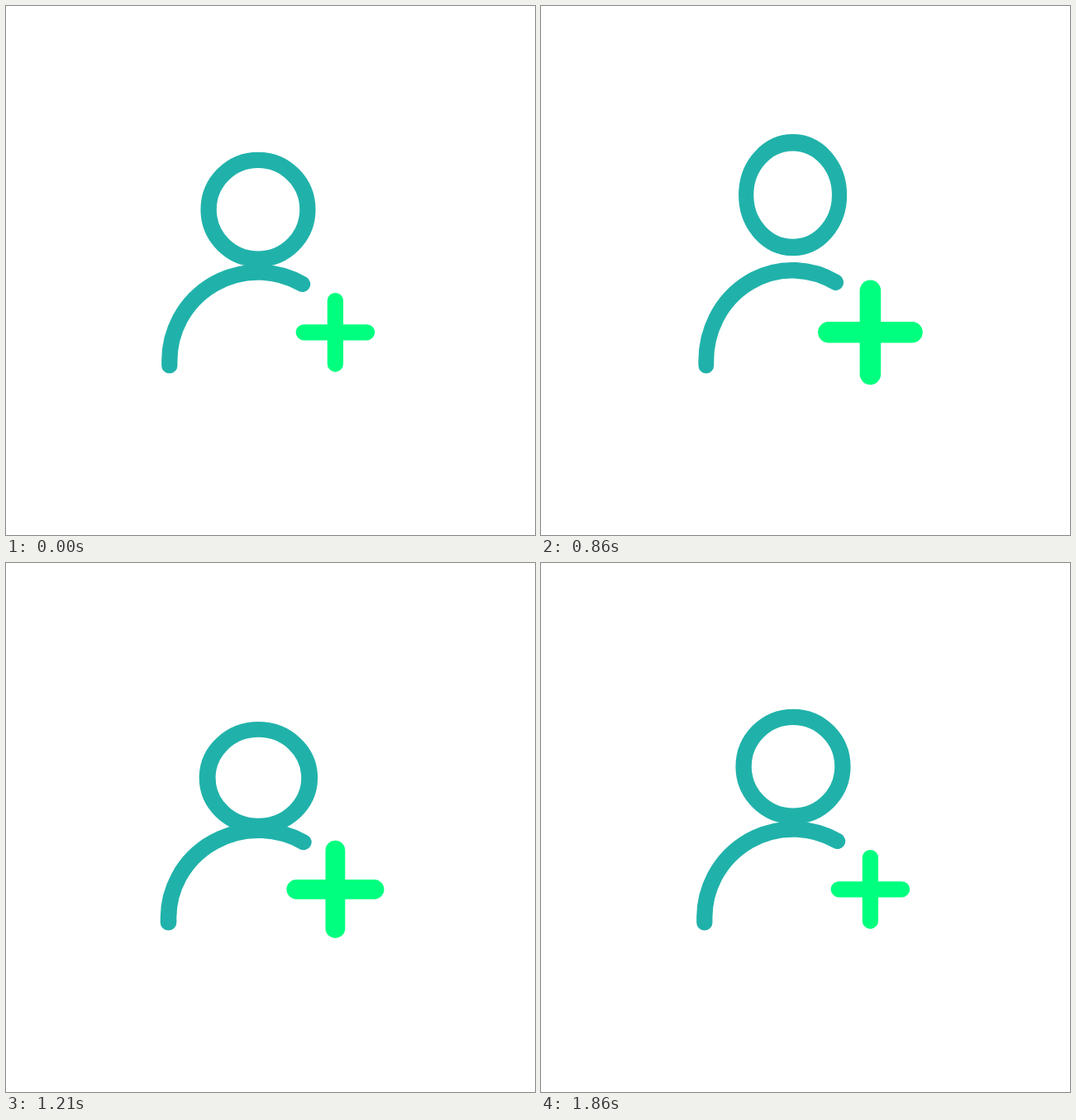
An HTML page that plays this animation: 640x640 px, repeating every 2.43 s.

```html
<!DOCTYPE html>
<html lang="en">
<head>
<meta charset="utf-8">
<title>Add user</title>
<style>
  html, body { margin: 0; width: 100%; height: 100%; overflow: hidden; background: #fff; }
  svg { display: block; width: 100vw; height: 100vh; }

  .stroke { fill: none; stroke-width: 19.3; stroke-linecap: round; }
  .user { stroke: #20b2aa; }
  .plus { stroke: #00ff7f; }

  .head, .body, .plus {
    animation: 2430ms cubic-bezier(.33, 0, .67, 1) infinite paused;
  }
  .head { transform-origin: 305px 246.2px; animation-name: hop, squash; }
  .body { transform-origin: 278px 444px; animation-name: breathe; }
  .plus { transform-origin: 398.4px 394.8px; animation-name: pulse; }

  @keyframes hop {
    0%, 22.06% { translate: 0 0; }
    40.59% { translate: -.5px -21.9px; }
    52.35% { translate: .5px 17.8px; }
    67.65%, 100% { translate: 0 0; }
  }
  @keyframes squash {
    0%, 22.06% { scale: 1 1; }
    40.59% { scale: .928 1.072; }
    51.18% { scale: 1.035 .971; }
    67.65%, 100% { scale: 1 1; }
  }
  @keyframes breathe {
    0%, 20.59% { scale: 1 1; }
    35.29%, 39.12% { scale: .975 1.019; }
    49.41% { scale: 1.016 .988; }
    67.65%, 100% { scale: 1 1; }
  }
  @keyframes pulse {
    0%, 20.59% { scale: 1; }
    38.24% { scale: 1.35; }
    41.18% { scale: 1.35; animation-timing-function: cubic-bezier(.44, 0, 0, 1); }
    76.47%, 100% { scale: 1; }
  }
</style>
</head>
<body>
<svg viewBox="0 0 640 640">
  <path class="stroke user body" d="M197.8 434.9V429A107.2 107.2 0 0 1 358.6 336.4"/>
  <circle class="stroke user head" cx="305" cy="246.2" r="59.9"/>
  <path class="stroke plus" d="M360.2 394.8h76.4M398.4 356.6v76.4"/>
</svg>
<script>
  // Advance the CSS animations in held steps of 14 per second.
  const LOOP = 2430, STEPS = 34, FPS = 14;
  const anims = document.getAnimations();
  const start = performance.now();

  function draw() {
    const t = (performance.now() - start) % LOOP;
    const step = Math.floor((Math.floor(t / 10) * 10 + 5) * FPS / 1000);
    for (const a of anims) a.currentTime = step * LOOP / STEPS;
    requestAnimationFrame(draw);
  }
  draw();
</script>
</body>
</html>
```
